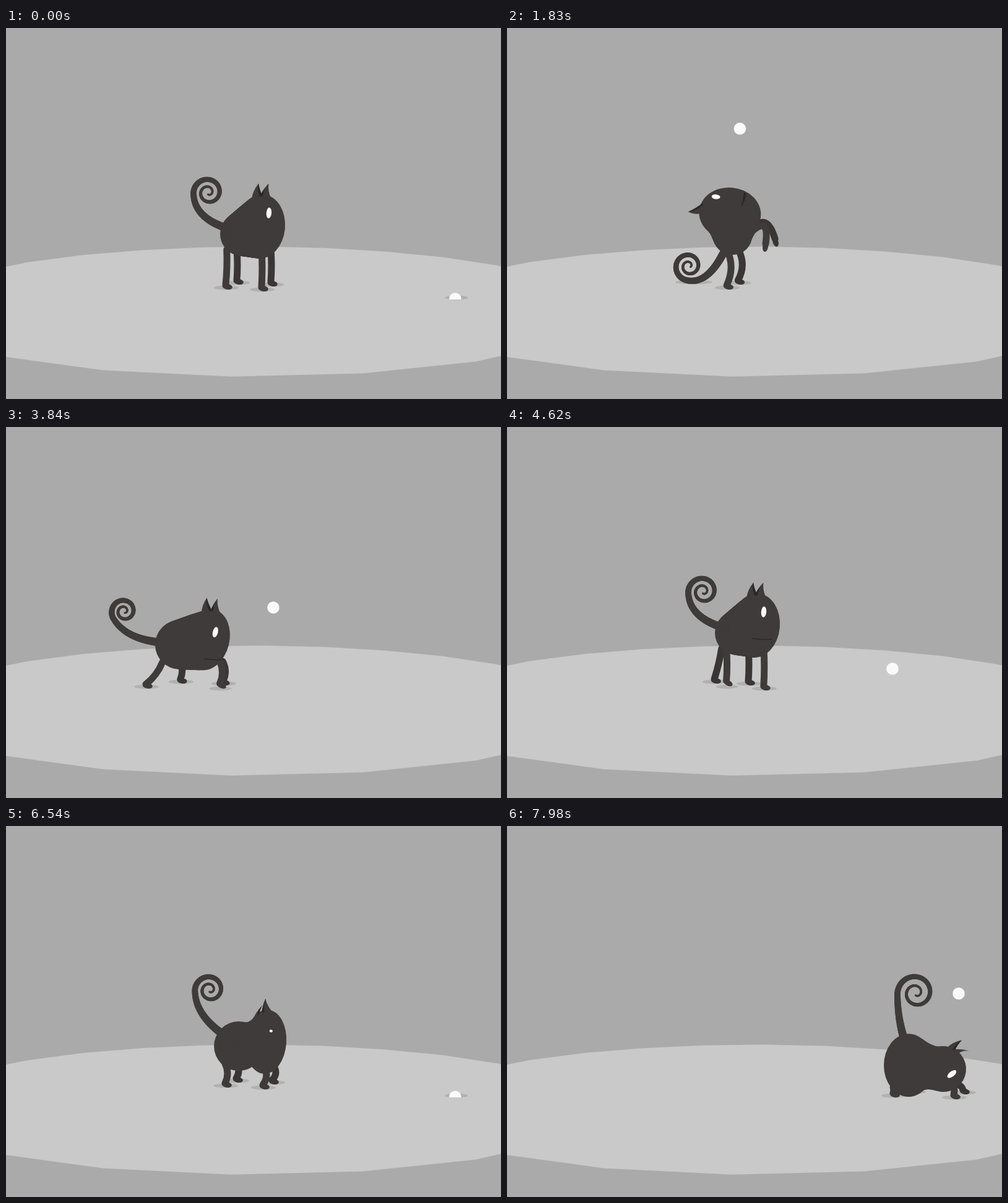
Animation, 800 px wide and 600 px high, one loop 8 s. Source, as an HTML page with a canvas:

```html
<!DOCTYPE html>
<html lang="en">
<head>
<meta charset="utf-8">
<title>Cat and ball</title>
<style>
  html, body { margin: 0; width: 100%; height: 100%; overflow: hidden; background: #aaa; }
  canvas { display: block; }
</style>
</head>
<body>
<canvas id="stage" width="800" height="600"></canvas>
<script>
const ctx = document.getElementById('stage').getContext('2d');
const LOOP = 8000, TICK = 30;
const FUR = '#3f3b3a', FAR_FUR = '#3a3635', DARK = '#2a2828', WHITE = '#fafafa';
const RAD = Math.PI / 180;

// Where each foot stands: offset from the body part that carries it, height, walking phase
const FEET = [
  { part: 'rump', dx: -27, y: 416, phase: 20 },
  { part: 'rump', dx: -9, y: 408, phase: -90 },
  { part: 'head', dx: 1, y: 419, phase: 155 },
  { part: 'head', dx: 16, y: 411, phase: -90 }
];

// A pose is two ellipses (x, y, rx, ry) joined to a body; everything else hangs on them.
// hind and front shift the feet, ears hold place and direction of each ear in degrees.
const stand = {
  rump: [382, 333, 36, 36], head: [412, 321, 39, 52], tilt: 5, dip: 0,
  eye: [11, -23], open: 1, ears: [-98, -84, -81, -77],
  hind: [0, 0], front: [0, 0], bow: [1, 1], walk: 0, floor: 0,
  curl: [327, 266], curlSize: 24, curlStart: 180
};
const bend = {
  ...stand, rump: [362, 335, 32, 32], head: [357, 300, 42, 50], tilt: -85,
  eye: [25, -25], open: .8, ears: [191, 165, -46, 121],
  hind: [20, 0], front: [58, -70], bow: [7, 24], curl: [293, 385], curlSize: 23, curlStart: 110
};
const land = {
  ...stand, rump: [243, 366, 41, 49], head: [287, 372, 39, 39], tilt: 60,
  eye: [13, -4], open: .2, ears: [-58, 0, -54, 5],
  hind: [-14, -136], front: [41, -4], bow: [15, 0], curl: [256, 260], curlSize: 26
};
const stalk = {
  ...stand, rump: [281, 352, 40, 40], head: [325, 344, 36, 50], tilt: 14,
  eye: [10, -15], ears: [-91, -90, -72, -83], walk: 1, bow: [3, 4],
  curl: [191, 298], curlSize: 21, curlStart: 150
};
const crouch = {
  ...stand, rump: [376, 356, 40, 40], head: [420, 349, 33, 52], tilt: 4, dip: .2,
  eye: [7, -18], open: .25, ears: [-114, -62, -87, -98],
  hind: [5, 0], front: [-6, 0], bow: [4, 6], curl: [329, 265]
};
const pounce = {
  ...stand, rump: [649, 387, 40, 51], head: [705, 393, 37, 37], tilt: 52, dip: .15,
  eye: [15, -6], ears: [-69, -39, -57, 0],
  hind: [2, 0], front: [16, 0], floor: 16, curl: [661, 270], curlSize: 30
};

// spin, hop and linear describe the way to the next key
const keys = [
  { t: 0, pose: stand },
  { t: 180, pose: stand },
  { t: 760, pose: bend, lean: -6 },
  { t: 960, pose: bend },
  { t: 1450, pose: bend, lean: -9 },
  { t: 1900, pose: bend, lean: 6 },
  { t: 2160, pose: bend, lean: -8, spin: -245, hop: 24, linear: true },
  { t: 2460, pose: land },
  { t: 2850, pose: stalk, x: -54 },
  { t: 3270, pose: stalk, x: -45 },
  { t: 3840, pose: stalk, linear: true },
  { t: 4620, pose: { ...stand, walk: 1 }, x: -10 },
  { t: 4900, pose: stand },
  { t: 5950, pose: stand },
  { t: 6480, pose: crouch },
  { t: 6800, pose: crouch, lean: 4 },
  { t: 7050, pose: crouch, lean: -4 },
  { t: 7430, pose: crouch, hop: 120, linear: true },
  { t: 7880, pose: pounce },
  { t: LOOP, pose: pounce }
];

const ballKeys = [
  [0, 726, 438], [420, 590, 290], [960, 369, 197], [1550, 338, 161], [2460, 508, 169],
  [2814, 508, 151], [3270, 498, 181], [3840, 432, 292], [4620, 623, 391],
  [5250, 730, 438], [5800, 726, 438], [7780, 726, 438], [7980, 730, 271], [LOOP, 731, 255]
].map(([t, x, y]) => ({ t, x, y }));

const lerp = (a, b, u) => a + (b - a) * u;
const clamp = (v, lo, hi) => Math.min(hi, Math.max(lo, v));
const along = ([x, y], angle, r) => [x + r * Math.cos(angle), y + r * Math.sin(angle)];
const middle = (a, b) => [(a[0] + b[0]) / 2, (a[1] + b[1]) / 2];
const rotate = ([x, y], a) => [x * Math.cos(a) - y * Math.sin(a), x * Math.sin(a) + y * Math.cos(a)];

function segment(list, t) {
  let i = 0;
  while (i < list.length - 2 && list[i + 1].t <= t) i++;
  return i;
}

function skeleton({ pose, x = 0, lean = 0 }, t) {
  const feet = FEET.map(({ part, dx, y, phase }) => {
    const shift = part === 'rump' ? pose.hind : pose.front;
    const swing = phase * RAD + (t - 4620) / 95;
    return [
      pose[part][0] + dx + shift[0] + pose.walk * 28 * Math.sin(swing),
      y + shift[1] + pose.floor - pose.walk * 6 * Math.max(0, Math.cos(swing))
    ];
  });
  return {
    points: [pose.rump, pose.head, pose.curl, ...feet]
      .map(([px, py]) => [px + x + lean * (420 - py) / 180, py]),
    angles: [pose.tilt, pose.curlStart, ...pose.ears],
    sizes: [...pose.rump.slice(2), ...pose.head.slice(2), ...pose.eye, ...pose.bow,
      pose.open, pose.dip, pose.walk, pose.floor, pose.curlSize]
  };
}

function catAt(t) {
  const i = segment(keys, t), from = keys[i], to = keys[i + 1];
  const { spin = 0, hop = 0, linear } = from;
  const time = (t - from.t) / (to.t - from.t);
  const u = linear ? time : time * time * (3 - 2 * time);
  const a = skeleton(from, t), b = skeleton(to, t);
  const ca = middle(...a.points), cb = middle(...b.points);
  const lift = hop * Math.sin(Math.PI * time);

  // Blend in a frame that turns with the body
  const points = a.points.map(([x, y], n) => {
    const end = rotate([b.points[n][0] - cb[0], b.points[n][1] - cb[1]], -spin * RAD);
    const [px, py] = rotate([lerp(x - ca[0], end[0], u), lerp(y - ca[1], end[1], u)], spin * RAD * u);
    return [px + lerp(ca[0], cb[0], u), py + lerp(ca[1], cb[1], u) - lift];
  });
  const angles = a.angles.map((start, n) => {
    const diff = b.angles[n] - spin - start;
    return (start + (diff - 360 * Math.round(diff / 360) + spin) * u) * RAD;
  });
  const sizes = a.sizes.map((v, n) => lerp(v, b.sizes[n], u));

  const [rump, head, curl, ...feet] = points;
  const [tilt, curlStart, ...ears] = angles;
  const [rumpX, rumpY, headX, headY, eyeX, eyeY, bowHind, bowFront, open, dip, walk, floor, curlSize] = sizes;
  return {
    rump: { at: rump, rx: rumpX, ry: rumpY }, head: { at: head, rx: headX, ry: headY, tilt },
    feet, curl, curlStart, curlSize, ears, eye: [eyeX, eyeY],
    bow: { rump: bowHind, head: bowFront }, open, dip, walk, floor
  };
}

// Monotone cubic through the ball keys
function ballAt(t) {
  const i = segment(ballKeys, t), a = ballKeys[i], b = ballKeys[i + 1];
  const span = b.t - a.t, u = (t - a.t) / span;
  const slope = (k, axis) => {
    const p = ballKeys[k - 1], q = ballKeys[k], r = ballKeys[k + 1];
    if (!p || !r || (q[axis] - p[axis]) * (r[axis] - q[axis]) <= 0) return 0;
    return (r[axis] - p[axis]) / (r.t - p.t) * span;
  };
  return ['x', 'y'].map(axis => lerp(a[axis], b[axis], u * u * (3 - 2 * u))
    + u * (1 - u) * ((1 - u) * slope(i, axis) - u * slope(i + 1, axis)));
}

function ellipse([x, y], rx, ry, fill, angle = 0) {
  ctx.beginPath();
  ctx.ellipse(x, y, rx, ry, angle, 0, 2 * Math.PI);
  ctx.fillStyle = fill;
  ctx.fill();
}

function curve(from, control, to, colour, width) {
  ctx.beginPath();
  ctx.moveTo(...from);
  ctx.quadraticCurveTo(...control, ...to);
  ctx.strokeStyle = colour;
  ctx.lineWidth = width;
  ctx.stroke();
}

function shadow(x, ground, height, width, reach) {
  const k = 1 - Math.max(0, height) / reach;
  if (k > 0) ellipse([x, ground], width * k, 3.6 * k, '#b1b1b1');
}

function drawBody({ rump, head, dip }) {
  for (let u = 0; u <= 1; u += 1 / 16) {
    const k = 1 - dip * 4 * u * (1 - u);
    const at = [0, 1].map(n => lerp(rump.at[n], head.at[n], u));
    ellipse(at, k * lerp(rump.rx, head.rx, u), k * lerp(rump.ry, head.ry, u), FUR, head.tilt * u);
  }
}

// The hip is the place in the body nearest to the foot
function drawLeg(cat, n, colour) {
  const { part, y } = FEET[n], { at, rx, ry } = cat[part], foot = cat.feet[n];
  const hip = [clamp(foot[0], at[0] - .7 * rx, at[0] + .7 * rx), clamp(foot[1], at[1] - .7 * ry, at[1] + .7 * ry)];
  const dx = foot[0] - hip[0], dy = foot[1] - hip[1], length = Math.hypot(dx, dy) || 1;
  const bow = 2 * cat.bow[part] / length, mid = middle(hip, foot);
  const knee = [mid[0] + dy * bow, mid[1] - dx * bow];
  curve(hip, knee, foot, colour, 11);

  const raised = clamp((y + cat.floor - foot[1]) / 20, 0, 1);
  const tangent = Math.atan2(foot[1] - knee[1], foot[0] - knee[0]);
  const paw = Math.atan2(lerp(.15, Math.sin(tangent), raised), lerp(1, Math.cos(tangent), raised));
  ellipse(along([foot[0], foot[1] + 2], paw, 3), 8, 4.5, colour, paw);
}

function drawTail({ rump, curl, curlStart, curlSize }) {
  const join = along(curl, curlStart, curlSize);
  const pull = along(join, curlStart - Math.PI / 2, -38 * -1 * -1).map((v, n) => 2 * join[n] - v);
  const lead = [join[0] + 38 * Math.sin(curlStart), join[1] - 38 * Math.cos(curlStart)];
  const away = Math.atan2(lead[1] - rump.at[1], lead[0] - rump.at[0]);
  const root = [rump.at[0] + .92 * rump.rx * Math.cos(away), rump.at[1] + .92 * rump.ry * Math.sin(away)];
  const path = [];
  for (let u = 0; u < 1; u += .04)
    path.push([0, 1].map(n => (1 - u) ** 2 * root[n] + 2 * u * (1 - u) * lead[n] + u * u * join[n]));
  for (let s = 0; s <= 1; s += .0125)
    path.push(along(curl, curlStart + s * 640 * RAD, curlSize * (1 - .87 * s)));
  for (let i = 1; i < path.length; i++)
    curve(path[i - 1], path[i - 1], path[i], FUR, 3 + 10 * (1 - i / path.length) ** 1.5);
}

function drawEar({ at, rx, ry, tilt }, place, direction, side) {
  const edge = angle => {
    const a = angle - tilt;
    return along(at, angle, .95 / Math.hypot(Math.cos(a) / rx, Math.sin(a) / ry));
  };
  const plain = edge(place - side * 11 * RAD), shaded = edge(place + side * 11 * RAD);
  const base = middle(plain, shaded), tip = along(base, direction, 23);
  const fill = (start, end, colour) => {
    ctx.beginPath();
    ctx.moveTo(...start);
    ctx.quadraticCurveTo(...along(middle(start, tip), direction - Math.PI / 2, 4), ...tip);
    ctx.quadraticCurveTo(...along(middle(end, tip), direction - Math.PI / 2, 2), ...end);
    ctx.fillStyle = colour;
    ctx.fill();
  };
  fill(plain, shaded, FUR);
  fill(middle(base, shaded), shaded, DARK);
}

function drawFace({ head, eye, open, walk }) {
  const [dx, dy] = rotate(eye, head.tilt), x = head.at[0] + dx, y = head.at[1] + dy;
  ellipse([x, y], 2 + 2.2 * open, 8.7 * open, WHITE, head.tilt);
  ctx.globalAlpha = walk;
  curve([x - 18, y + 43], [x, y + 46], [x + 13, y + 44], DARK, 1.5);
  ctx.globalAlpha = 1;
}

function drawCat(cat) {
  const { rump, head, feet, curl, ears, floor } = cat;
  FEET.forEach(({ y }, n) => shadow(feet[n][0] + 1, y + 4 + floor, y + floor - feet[n][1], 20, 45));
  shadow(rump.at[0], 414 + floor, 412 + floor - rump.at[1] - rump.ry, 28, 12);
  shadow(curl[0] + 8, 411, 385 - curl[1], 30, 20);
  drawLeg(cat, 1, FAR_FUR);
  drawLeg(cat, 3, FAR_FUR);
  drawTail(cat);
  drawBody(cat);
  drawLeg(cat, 0, FUR);
  drawLeg(cat, 2, FUR);
  drawEar(head, ears[0], ears[1], 1);
  drawEar(head, ears[2], ears[3], -1);
  drawFace(cat);
}

function drawBall([x, y]) {
  shadow(x + 2, 436, 436 - y, 18.5, 30);
  ctx.save();
  ctx.beginPath();
  ctx.rect(0, 0, 800, 439);
  ctx.clip();
  ellipse([x, y], 9.8, 9.8, WHITE);
  ctx.restore();
}

// A 24-sided disc in perspective
function drawFloor() {
  ctx.beginPath();
  for (let i = 0; i < 24; i++) {
    const a = (92.5 + 15 * i) * RAD, depth = 1 - .375 * Math.sin(a);
    ctx.lineTo(400 + 519 * Math.cos(a) / depth, 419.3 + 90.4 * Math.sin(a) / depth);
  }
  ctx.fillStyle = '#c9c9c9';
  ctx.fill();
}

function frame(now) {
  const t = Math.floor(now % LOOP / TICK) * TICK;
  ctx.lineCap = ctx.lineJoin = 'round';
  ctx.fillStyle = '#aaa';
  ctx.fillRect(0, 0, 800, 600);
  drawFloor();
  drawBall(ballAt(t));
  drawCat(catAt(t));
  requestAnimationFrame(frame);
}
requestAnimationFrame(frame);
</script>
</body>
</html>
```
